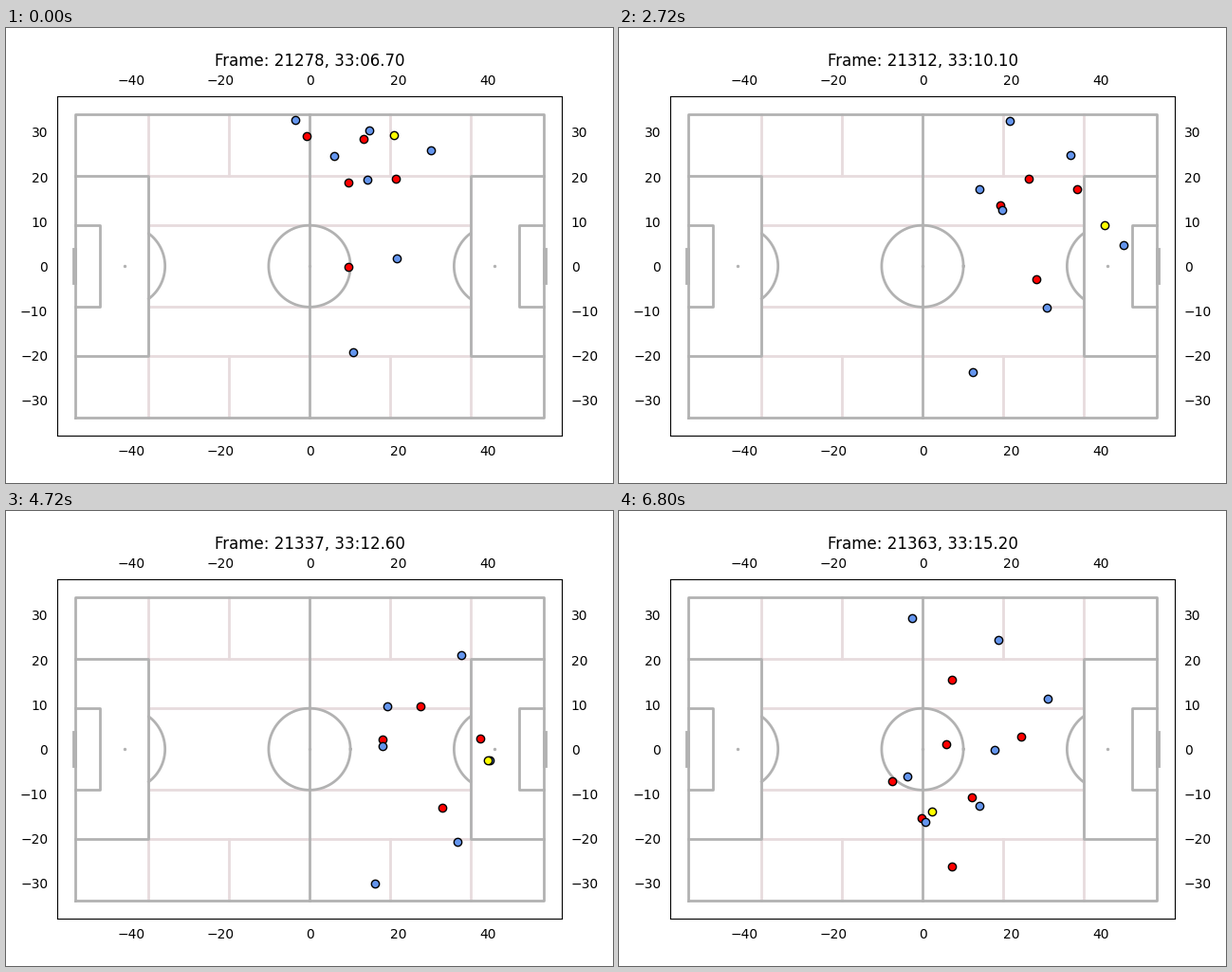
These frames come from a looping animation (640x480 px, 7.66 s). A matplotlib script:

```python
import numpy as np
import matplotlib.pyplot as plt
from matplotlib.animation import FuncAnimation
from matplotlib.transforms import IdentityTransform

W, H = 640, 480
STEPS = 86            # one position per 80 ms; the last one is held
TICK, TICKS = 20, 383
END = STEPS - 1

GREY, PINK = "#b2b2b2", "#e7dbdd"

# Pitch of 105 x 68 m with a 4 m margin, centred on the stage at (CX, CY)
CX, CY = 320.02, 251.24
HALF_L, HALF_W, MARGIN = 52.5, 34, 4
XMAX, YMAX = HALF_L + MARGIN, HALF_W + MARGIN
SCALE = 532.2 / (2 * XMAX)
BOX_X, BOX_Y = 36, 20.16
AREA_X, AREA_Y = 47, 9.16
SPOT_X, RADIUS = 41.5, 9.15
GOAL_X, GOAL_Y = HALF_L + 0.15, 3.66

fig = plt.figure(figsize=(W / 100, H / 100), dpi=100, facecolor="white")
ax = fig.add_axes([(CX - XMAX * SCALE) / W, (H - CY - YMAX * SCALE) / H,
                   2 * XMAX * SCALE / W, 2 * YMAX * SCALE / H])
ax.set(xlim=(-XMAX, XMAX), ylim=(-YMAX, YMAX), xticks=[], yticks=[])


def line(xs, ys, color=GREY, lw=2, z=2):
    ax.plot(xs, ys, color=color, lw=lw, zorder=z)


def arc(cx, start, stop):
    a = np.radians(np.linspace(start, stop, 120))
    line(cx + RADIUS * np.cos(a), RADIUS * np.sin(a))


def draw_zones():
    for s in (-1, 1):
        line((s * BOX_X, s * BOX_X), (-HALF_W, HALF_W), PINK, z=1)
        for y in (AREA_Y, BOX_Y):
            line((-BOX_X, BOX_X), (s * y, s * y), PINK, z=1)
        for x in (-BOX_X / 2, BOX_X / 2):
            line((x, x), (s * BOX_Y, s * HALF_W), PINK, z=1)


def draw_pitch():
    line(HALF_L * np.array([-1, 1, 1, -1, -1]),
         HALF_W * np.array([-1, -1, 1, 1, -1]))
    line((0, 0), (-HALF_W, HALF_W))
    arc(0, 0, 360)
    open_angle = np.degrees(np.arccos((SPOT_X - BOX_X) / RADIUS))
    for s in (-1, 1):
        for x, y in ((BOX_X, BOX_Y), (AREA_X, AREA_Y)):
            line((s * HALF_L, s * x, s * x, s * HALF_L), (-y, -y, y, y))
        line((s * GOAL_X, s * GOAL_X), (-GOAL_Y, GOAL_Y), lw=3.5)
        mid = 90 + 90 * s
        arc(s * SPOT_X, mid - open_angle, mid + open_angle)
    ax.scatter((-SPOT_X, 0, SPOT_X), (0, 0, 0), s=6, color=GREY, lw=0)


def draw_labels():
    gap = 7 * 100 / 72 / SCALE
    sides = ((-1, "top", "right"), (1, "bottom", "left"))
    for s, va, ha in sides:
        for v in range(-40, 41, 20):
            ax.text(v, s * (YMAX + gap), f"{v}".replace("-", "\u2212"),
                    ha="center", va=va)
        for v in range(-30, 31, 10):
            ax.text(s * (XMAX + gap), v, f"{v}".replace("-", "\u2212"),
                    ha=ha, va="center_baseline")


def run(*points, first=0, last=END):
    """Smooth run through points evenly spaced in time; NaN out of view."""
    p = np.array(points, float)
    m = np.gradient(p, axis=0)
    s = np.linspace(0, len(p) - 1, last - first + 1)
    i = np.minimum(s.astype(int), len(p) - 2)
    u = (s - i)[:, None]
    path = np.full((STEPS, 2), np.nan)
    path[first:last + 1] = (
        (1 + 2 * u) * (1 - u) ** 2 * p[i] + u * (1 - u) ** 2 * m[i]
        + u * u * (3 - 2 * u) * p[i + 1] + u * u * (u - 1) * m[i + 1])
    return path


def stroll(first, x, y):
    """Player who comes into view late and drifts to (x, y)."""
    back = END - first
    return run((x + 0.6 * back, y - 0.2 * back), (x, y), first=first)


# Stage pixels, y down
keeper = run((533, 228), (520, 242), (506, 272), (500, 289),
             first=33, last=79)
blue = [
    keeper,
    run((305, 97), (304, 97), last=2),
    run((383, 108), (406, 94), (412, 98), (410, 109), last=50),
    run((346, 135), (374, 163), (401, 202), (396, 252)),
    run((381, 160), (403, 182), (398, 243), (380, 311)),
    run((448, 129), (473, 132), (481, 149), (452, 198)),
    run((412, 243), (436, 271), (465, 322), (483, 367), last=68),
    run((366, 342), (370, 356), (386, 390), (407, 398), last=82),
    stroll(70, 400, 136), stroll(79, 309, 113),
    stroll(81, 304, 280), stroll(79, 323, 328),
]
red = [
    run((317, 114), (338, 130), last=16),
    run((377, 117), (427, 150), (437, 202), (424, 238)),
    run((361, 163), (399, 178), (398, 236), (372, 302)),
    run((411, 159), (471, 156), (501, 222), (484, 298), last=79),
    run((361, 252), (428, 253), (458, 304), (458, 334), last=79),
    stroll(70, 351, 178), stroll(68, 345, 246), stroll(72, 351, 375),
    stroll(82, 288, 285), stroll(80, 319, 324),
]


def ball_path():
    """Straight passes; the keeper holds the ball between catch and throw."""
    catch, throw = 40, 66
    held = keeper - (2, 0)
    t = np.array([0, 8, 23, catch, throw, 77, END])
    p = np.array([(409, 113), (453, 123), (488, 161),
                  held[catch], held[throw], (399, 311), (330, 317)])
    path = np.column_stack([np.interp(range(STEPS), t, c) for c in p.T])
    path[catch:throw] = held[catch:throw]
    return path


def dots(color, z):
    return ax.plot([], [], "o", ms=6, mfc=color, mec="black", mew=1, zorder=z,
                   transform=IdentityTransform())[0]


draw_zones()
draw_pitch()
draw_labels()
title = fig.text(0.5, 440 / H, "", size=12, ha="center", va="baseline")

groups = [
    (dots("red", 4), np.array(red)),
    (dots("cornflowerblue", 5), np.array(blue)),
    (dots("yellow", 6), ball_path()[None]),
]


def update(tick):
    n = min(tick * TICK // 80, END)
    title.set_text(f"Frame: {21278 + n}, 33:{(67 + n) / 10:05.2f}")
    for artist, pos in groups:
        artist.set_data(pos[:, n, 0], H - pos[:, n, 1])
    return [title] + [g[0] for g in groups]


anim = FuncAnimation(fig, update, frames=TICKS, interval=TICK, repeat=True,
                     cache_frame_data=False)
plt.show()
```
